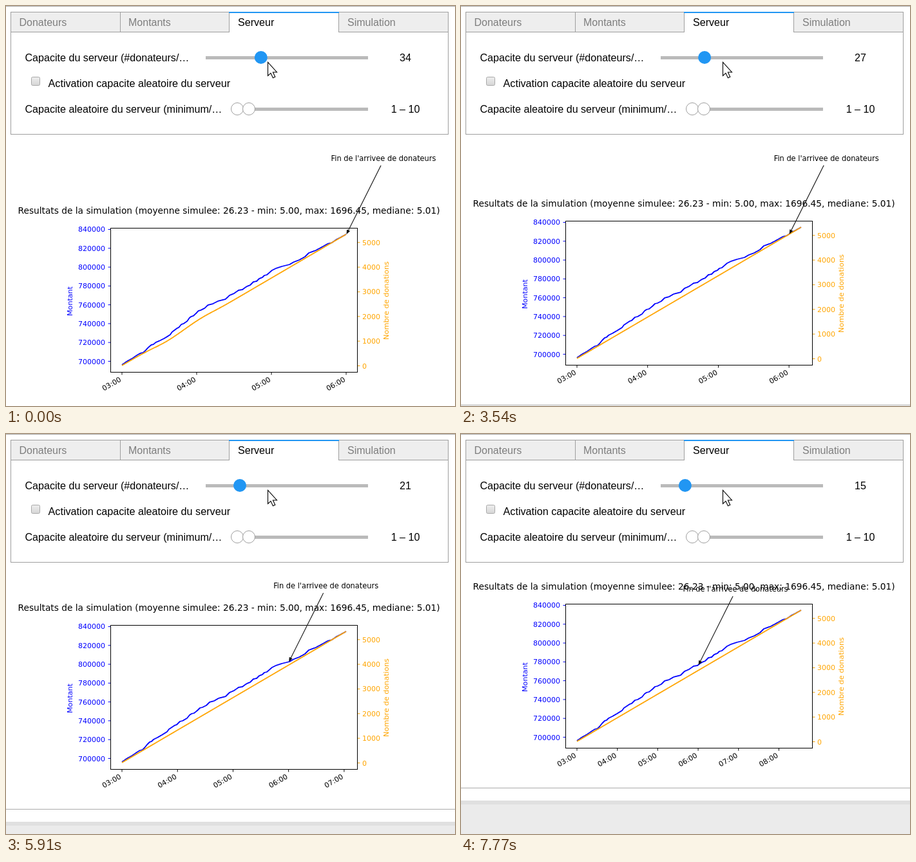
An HTML page that plays this animation: 697 by 622 pixels, repeating every 8000 ms.

```html
<!DOCTYPE html>
<html lang="fr">
<head>
<meta charset="utf-8">
<title>Simulation</title>
<style>
  html, body { margin: 0; width: 100%; height: 100%; overflow: hidden; background: #fff; }
  svg { display: block; }
  .ui { font: 16.1px "Liberation Sans", Arial, sans-serif; }
  .plot { font: 11px "DejaVu Sans", sans-serif; }
  .tab { fill: #eee; stroke: #9e9e9e; }
  .idle { fill: #7d7d7d; font-size: 16px; }
  .track { fill: #bababa; }
  .knob { fill: #fff; stroke: #9e9e9e; }
  .line { fill: none; stroke-width: 1.8; stroke-linejoin: round; }
</style>
</head>
<body>
<svg id="stage" width="697" height="622" viewBox="0 0 697 622">
  <defs>
    <linearGradient id="box" x2="0" y2="1">
      <stop offset="0" stop-color="#eee"/><stop offset="1" stop-color="#d6d6d6"/>
    </linearGradient>
  </defs>
  <rect width="697" height="622" fill="#fff"/>
  <path d="M0 .5H697" stroke="#ababab"/>

  <g id="footer">
    <path d="M0 .5H697" stroke="#ababab"/>
    <rect y="20" width="697" height="200" fill="#ebebeb"/>
    <rect y="20" width="697" height="6" fill="#e0e0e0"/>
  </g>

  <g class="ui">
    <rect x="7.5" y="40.5" width="679" height="159" fill="#fff" stroke="#9e9e9e"/>
    <rect class="tab" x="7.5" y="9.5" width="170" height="31"/>
    <rect class="tab" x="177.5" y="9.5" width="169" height="31"/>
    <rect class="tab" x="516.5" y="9.5" width="170" height="31"/>
    <rect x="347" y="10" width="169" height="32" fill="#fff"/>
    <rect x="346" y="9" width="171" height="2" fill="#2196f3"/>
    <text class="idle" x="20.5" y="31">Donateurs</text>
    <text class="idle" x="190" y="31">Montants</text>
    <text x="360" y="31">Serveur</text>
    <text class="idle" x="530" y="31">Simulation</text>

    <text x="29.5" y="86">Capacite du serveur (#donateurs/…</text>
    <rect class="track" x="310" y="78" width="252" height="5"/>
    <circle id="thumb" cy="80" r="10" fill="#2196f3"/>
    <text id="value" x="620" y="86" text-anchor="middle"></text>

    <rect x="39.5" y="110.5" width="13" height="13" rx="2" fill="url(#box)" stroke="#a8a8a8"/>
    <text x="65.5" y="126" font-size="16.2">Activation capacite aleatoire du serveur</text>

    <text x="29.5" y="166">Capacite aleatoire du serveur (minimum/…</text>
    <rect class="track" x="352" y="158" width="210" height="5"/>
    <circle class="knob" cx="359" cy="160" r="9.5"/>
    <circle class="knob" cx="377" cy="160" r="9.5"/>
    <text x="620" y="166" text-anchor="middle">1 – 10</text>
  </g>

  <g class="plot">
    <g id="chart">
      <path id="blue" class="line" stroke="#00f"/>
      <path id="orange" class="line" stroke="#ffa500"/>
      <g id="yAxes"></g>
      <g id="hours"></g>
      <rect x="162.5" y="345.5" width="383" height="224" fill="none" stroke="#000"/>
      <text fill="#00f" font-size="11.1" text-anchor="middle" transform="translate(103 459) rotate(-90)">Montant</text>
      <text fill="#ffa500" font-size="11.3" text-anchor="middle" transform="translate(594 458) rotate(-90)">Nombre de donations</text>
      <text x="18.5" y="323" font-size="13.74">Resultats de la simulation (moyenne simulee: 26.23 - min: 5.00, max: 1696.45, mediane: 5.01)</text>
    </g>
    <g id="note">
      <text x="-24" y="-114" font-size="11.38">Fin de l'arrivee de donateurs</text>
      <path d="M53.5 -107L1 -2" stroke="#222" stroke-width="1.2"/>
      <path d="M0 0L.6 -7.5L5.6 -5Z" fill="#111"/>
    </g>
  </g>

  <path d="M406.5 87.5V108.5L411 104.3L414.4 111.8L417.8 110.3L414.4 103H420.5Z" fill="#fff" stroke="#000" stroke-width="1.1"/>
</svg>
<script>
const LOOP = 8000, LEFT = 180, WIDTH = 348, BOTTOM = 559, HEIGHT = 204;
const DONATIONS = 5328;

// Each time lowers the capacity by one: first on the slider, then in the plot.
const sliderSteps = [400, 800, 1220, 1870, 2390, 3020, 3540, 3800, 4240, 4870,
  5180, 5450, 5910, 6240, 6530, 6940, 7140, 7500, 7770];
const plotSteps = [190, 610, 1010, 1430, 2120, 2640, 3290, 3750, 4050, 4420,
  5150, 5400, 5680, 6190, 6460, 6750, 7080, 7440, 7770];

// Cumulated amount against the order of the donations.
const amounts = `180,558 187,553 196,548 203,543 208,540 212,539 215,536 219,531 223,527
  226,526 229,523 235,520 242,516 250,511 253,507 262,501 265,500 270,495 274,494 281,490
  285,485 288,483 292,482 297,478 301,474 305,473 311,470 316,465 323,463 330,459 341,456
  347,450 354,447 361,442 367,441 371,438 374,436 379,434 384,429 389,428 393,424 398,422
  401,419 405,418 413,411 419,408 428,405 440,402 447,398 455,395 464,390 470,384 481,380
  492,374 499,370 506,368 513,363 519,360 528,355`
  .trim().split(/\s+/).map(p => p.split(',').map(Number));

const $ = id => document.getElementById(id);
const bell = (u, mid, spread) => Math.exp(-(((u - mid) / spread) ** 2));

function amountY(share) {
  const x = LEFT + WIDTH * share;
  let i = 1;
  while (i < amounts.length - 1 && amounts[i][0] < x) i++;
  const [x0, y0] = amounts[i - 1], [x1, y1] = amounts[i];
  return y0 + (y1 - y0) * (x - x0) / (x1 - x0);
}

// Share of donations served at u; a fast server follows the uneven arrivals.
function served(u, capacity) {
  const slack = Math.max(0, capacity - 30) / 5;
  return u + slack * (0.008 * bell(u, 0.36, 0.07) - 0.015 * bell(u, 0.2, 0.08));
}

function curve(y, capacity) {
  let d = '';
  for (let i = 0; i <= WIDTH; i++)
    d += `${i ? 'L' : 'M'}${LEFT + i} ${y(served(i / WIDTH, capacity)).toFixed(2)}`;
  return d;
}

function yAxes() {
  let s = '';
  for (let i = 0; i < 8; i++) {
    const y = 552.5 - i * 29.29;
    s += `<path d="M158.5 ${y}H162" stroke="#00f"/>
      <text x="154" y="${y + 4}" fill="#00f" text-anchor="end">${700000 + i * 20000}</text>`;
  }
  for (let i = 0; i < 6; i++) {
    const y = 559.5 - i * 38.35;
    s += `<path d="M546 ${y}H549.5" stroke="#ffa500"/>
      <text x="553" y="${y + 4}" fill="#ffa500">${i * 1000}</text>`;
  }
  return s;
}

function hourTicks(perHour) {
  let s = '';
  for (let h = 0; LEFT + h * perHour < 545; h++) {
    const x = LEFT + h * perHour;
    s += `<path d="M${x} 569V573.5" stroke="#000"/>
      <text text-anchor="end" transform="translate(${x - 0.5} 583) rotate(-30)">0${3 + h}:00</text>`;
  }
  return s;
}

function drawPlot(capacity) {
  const duration = Math.max(3, DONATIONS / (60 * capacity));
  const end = 3 / duration;
  const tip = amountY(end);
  // The picture is cropped at its highest text: the note or the title.
  const shift = Math.max(-81, Math.round(354.6 - tip));
  $('blue').setAttribute('d', curve(amountY, capacity));
  $('orange').setAttribute('d', curve(n => BOTTOM - HEIGHT * n, capacity));
  $('hours').innerHTML = hourTicks(WIDTH / duration);
  $('chart').setAttribute('transform', `translate(0 ${shift})`);
  $('note').setAttribute('transform', `translate(${LEFT + WIDTH * end + 0.5} ${tip + shift})`);
  $('footer').setAttribute('transform', `translate(0 ${631 + shift})`);
}

function drawSlider(capacity) {
  $('thumb').setAttribute('cx', 310.1 + 2.52 * capacity);
  $('value').textContent = capacity;
}

const lowered = (start, steps, t) => start - steps.filter(s => s <= t).length;
let slider, plot;

function render(t) {
  const newSlider = lowered(34, sliderSteps, t);
  const newPlot = lowered(35, plotSteps, t);
  if (newSlider !== slider) drawSlider(slider = newSlider);
  if (newPlot !== plot) drawPlot(plot = newPlot);
}

$('yAxes').innerHTML = yAxes();
const began = performance.now();
function tick() {
  render((performance.now() - began) % LOOP);
  requestAnimationFrame(tick);
}
tick();
</script>
</body>
</html>
```
